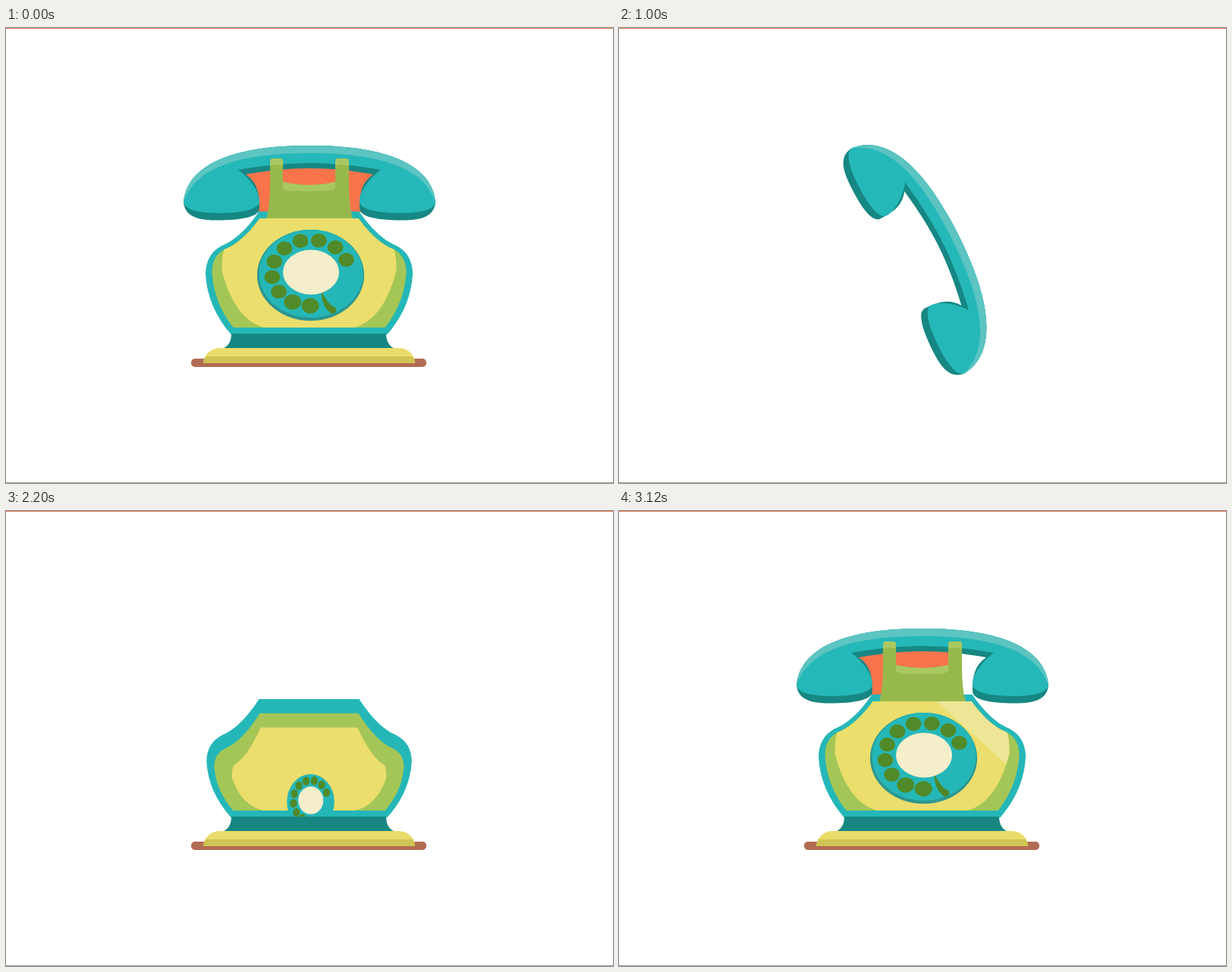
An HTML page that plays this animation: 800x600 px, repeating every 3160 ms.

```html
<!DOCTYPE html>
<html lang="en">
<head>
<meta charset="utf-8">
<title>Rotary telephone</title>
<style>
  html, body { margin: 0; width: 100%; height: 100%; overflow: hidden; background: #fff; }
  svg { display: block; width: 800px; height: 600px; }
</style>
</head>
<body>
<svg viewBox="0 0 800 600">
  <defs>
    <clipPath id="faceClip"><path id="faceClipPath"/></clipPath>
  </defs>

  <g id="gap" fill="#f9744b">
    <path d="M312 184H452V243H328Z"/>
    <path id="gapRight" d="M451 184H488L472 243H451Z"/>
  </g>

  <path id="shell" fill="#25b7b8"/>
  <g id="handset">
    <path id="handsetEdge" fill="#178783"/>
    <path id="handsetBody" fill="#25b8b9"/>
    <path id="handsetLight" fill="#5cc4c1"/>
  </g>
  <g id="cradle">
    <path id="cradleBody" fill="#97b94c"/>
    <path id="cradleLight" fill="#a9c862"/>
  </g>
  <path id="side" fill="#a4c656"/>
  <path id="face" fill="#ebde6c"/>
  <g clip-path="url(#faceClip)">
    <rect id="shine" x="-300" y="-95" width="600" height="95" fill="#eee596"/>
  </g>

  <g id="dial">
    <ellipse rx="70" ry="59" fill="#25b7b8"/>
    <g id="detail">
      <ellipse cy="1" rx="70.500" ry="60" fill="#2c9690"/>
      <ellipse cx=".5" cy="-1" rx="68.500" ry="58" fill="#25b7b8"/>
      <path fill="#4f8726" d="M14 23C21 32 22 39 33 44Q36 50 28 52Q15 44 14 23Z"/>
    </g>
    <g id="holes" fill="#518a28"></g>
    <ellipse cx=".5" cy="-3" rx="37" ry="29.500" fill="#f4eecb"/>
  </g>

  <path id="neck" fill="#168782"/>
  <g id="base">
    <rect x="244" y="436" width="310" height="11" rx="5" fill="#b26c53"/>
    <path fill="#e9dc6a" d="M260 441C262 428 272 422 282 422H517C528 422 538 429 539 441Z"/>
    <path fill="#cfc453" d="M263 433H536Q539 437 539 442H260Q260 437 263 433Z"/>
  </g>

  <path d="M0 .5H800" stroke="#e8764f"/>
  <path d="M0 599.500H800" stroke="#9a9a9a"/>
</svg>
<script>
const LOOP = 3160, STEP = 40, TURNAROUND = 1200;
const $ = id => document.getElementById(id);
const set = (id, name, value) => $(id).setAttribute(name, value);
const show = (id, on) => set(id, 'visibility', on ? 'visible' : 'hidden');

const span = (t, from, to) => Math.max(0, Math.min(1, (t - from) / (to - from)));
const mix = (a, b, p) => a + (b - a) * p;
const smooth = p => p * p * (3 - 2 * p);
const easeOut = p => 1 - (1 - p) ** 3;
const backIn = (p, s) => p * p * ((s + 1) * p - s);
const backOut = (p, s) => 1 - backIn(1 - p, s);
const leaving = t => span(t, 540, 930);

// Closed path from the points of its left half, mirrored about a vertical axis.
function symmetric(command, left, axis) {
  const right = left.map(([x, y]) => [2 * axis - x, y]).reverse();
  return `M${left[0]}${command}${left.slice(1).join(' ')}L${right[0]}${command}${right.slice(1).join(' ')}Z`;
}

// Body layers from back to front; widths are measured from the axis.
const layers = [
  { id: 'shell', top: 242, neck: 66, shoulder: [115, 287], belly: [136.5, 325], foot: [103, 404],
    bend: [.08, .55], exit: t => leaving(t) ** 5 },
  { id: 'side', top: 251, neck: 65, shoulder: [112, 292], belly: [128, 322], foot: [100, 395],
    bend: [.08, .55], exit: t => leaving(t) ** 3 },
  { id: 'face', top: 251, neck: 65, shoulder: [112, 292], belly: [115, 320], foot: [60, 395],
    bend: [.3, .85], exit: t => smooth(span(t, 480, 780)) }
];

function layerPath({ top, neck, shoulder, belly, foot, bend }, grow) {
  const axis = 399.5;
  // Shoulders and belly lag behind the rising top edge.
  const sink = ([w, y]) => [mix(foot[0], w, grow), mix(foot[1], y, grow ** 2)];
  const between = (a, b, u, v) => [mix(a[0], b[0], u), mix(a[1], b[1], v)];
  const rim = [Math.min(neck, mix(foot[0], neck, grow)), mix(foot[1], top, grow)];
  const s = sink(shoulder), b = sink(belly);
  const points = [rim, between(rim, s, .5, .79), s, between(s, b, 1, .3), b, between(b, foot, ...bend), foot];
  return symmetric('Q', points.map(([w, y]) => [axis - w, y]), axis);
}

function buildHandset() {
  const crown = [[400, 155], [263, 155], [236, 200], [234, 230]];
  const lobes = (bottom, x, y, bar) => symmetric('C', [...crown,
    [236, bottom - 5], [252, bottom], [278, bottom], [310, bottom], [334, bottom - 4], [334, bottom - 16],
    [334, 215], [x + 14, y + 10], [x, y], [mix(x, 400, .33), mix(y, bar, .6)], [mix(x, 400, .67), bar], [400, bar]], 400);
  set('handsetEdge', 'd', lobes(253.5, 316, 193, 185));
  set('handsetBody', 'd', lobes(244, 306, 187, 178));
  set('handsetLight', 'd', symmetric('C', [...crown, [244, 200], [275, 165], [400, 165]], 400));
}

function buildHoles() {
  for (let i = 0; i < 10; i++) {
    const angle = -(23 + i * 27.4) * Math.PI / 180;
    const size = i > 7 ? 1.1 : 1;
    const hole = document.createElementNS('http://www.w3.org/2000/svg', 'ellipse');
    hole.setAttribute('cx', 51 * Math.cos(angle));
    hole.setAttribute('cy', 43.5 * Math.sin(angle) - 2.2);
    hole.setAttribute('rx', 10.4 * size);
    hole.setAttribute('ry', 9.2 * size);
    $('holes').append(hole);
  }
}

function drawHandset(t) {
  let x = 400, y = 205, turn = 0;
  if (t < TURNAROUND) {
    const drop = Math.max(0, (t - 700) / 300);
    x += 3 * drop;
    y += 201 * drop ** 4 - 110 * smooth(span(t, 400, 700));
    turn = 63.5 * Math.max(0, (t - 576) / 424) ** 3;
  } else {
    y -= 330 * (1 - easeOut(span(t, 2520, 2870)));
  }
  show('handset', t < 1120 || t > 2520);
  set('handset', 'transform', `translate(${x} ${y}) rotate(${turn}) translate(-400 -205)`);
}

function drawCradle(t) {
  const height = t < TURNAROUND ? 1 - backIn(leaving(t), 2.3) : easeOut(span(t, 2600, 2886));
  const top = 395 - 223 * height;
  const notch = 395 - 189 * Math.min(1, height);
  const cap = 10 * height ** 3, light = 9 * height ** 3;
  const foot = Math.max(252, notch);
  const prong = (a, b) => `${a} ${top + 4}Q${a} ${top} ${a + 4} ${top}H${b - 4}Q${b} ${top} ${b} ${top + 4}`;
  const tip = (a, b) => `M${prong(a, b)}V${top + cap}Q${(a + b) / 2} ${top + cap - 4} ${a} ${top + cap}Z`;
  const dip = `365 ${notch - 3}Q400 ${notch + 5} 434 ${notch - 3}`;
  const edge = notch + light;
  show('cradle', height > 0);
  set('cradleBody', 'd', `M${prong(348, 365)}L${dip}L${prong(434, 452)}V${notch}Q452 ${foot - 17} 457 ${foot}` +
    `V394H343V${foot}Q348 ${foot - 17} 348 ${notch}Z`);
  set('cradleLight', 'd', tip(348, 365) + tip(434, 452) +
    `M${dip}V${edge - 4}Q430 ${edge} 420 ${edge}H378Q369 ${edge} 365 ${edge - 4}Z`);
}

function drawBody(t) {
  layers.forEach((layer, i) => {
    const start = 1760 + 95 * i;
    const grow = t < TURNAROUND ? 1 - layer.exit(t) : easeOut(span(t, start, start + 660));
    show(layer.id, grow > 0);
    set(layer.id, 'd', layerPath(layer, grow));
  });
  set('faceClipPath', 'd', $('face').getAttribute('d'));

  const sweep = (3120 - t) * 1.1;
  show('shine', t >= 2880);
  set('shine', 'transform', `translate(${466 - sweep * .67} ${294 + sweep * .74}) rotate(42)`);
}

function drawDial(t) {
  const scale = delay => t < TURNAROUND
    ? 1 - backIn(leaving(t), 2.3)
    : backOut(span(t, 2140 + delay, 2500 + delay), 1.7);
  const sx = scale(20), sy = scale(0);
  show('dial', sx > 0);
  set('dial', 'transform', `translate(401.5 ${398 - 73 * Math.min(1, sx) ** 2}) scale(${sx} ${sy})`);
  set('detail', 'opacity', t < TURNAROUND ? 1 - span(t, 480, 640) : span(t, 2400, 2520));
}

function drawBase(t) {
  const rise = span(t, 1560, 1910);
  const height = t < TURNAROUND ? 1 - smooth(span(t, 840, 940)) : backOut(rise, 4.3);
  const flare = t < TURNAROUND ? 12 : 12 * rise ** 2;
  const top = 422 - 19 * height;
  show('neck', height > 0);
  set('neck', 'd', symmetric('C',
    [[297, top], [297, top + 10], [297 - flare / 3, 420], [297 - flare, 423]], 399));

  const size = t < TURNAROUND ? 1 - smooth(span(t, 860, 980)) : easeOut(span(t, 1280, 1600));
  show('base', size > 0);
  set('base', 'transform', `translate(399 447) scale(${size}) translate(-399 -447)`);
}

function draw(t) {
  show('gap', t <= 400 || t >= 2920);
  show('gapRight', t <= 400);
  drawHandset(t);
  drawCradle(t);
  drawBody(t);
  drawDial(t);
  drawBase(t);
}

buildHandset();
buildHoles();
const start = performance.now();
function tick() {
  const t = (performance.now() - start) % LOOP;
  draw(Math.floor(t / STEP) * STEP);
  requestAnimationFrame(tick);
}
tick();
</script>
</body>
</html>
```
